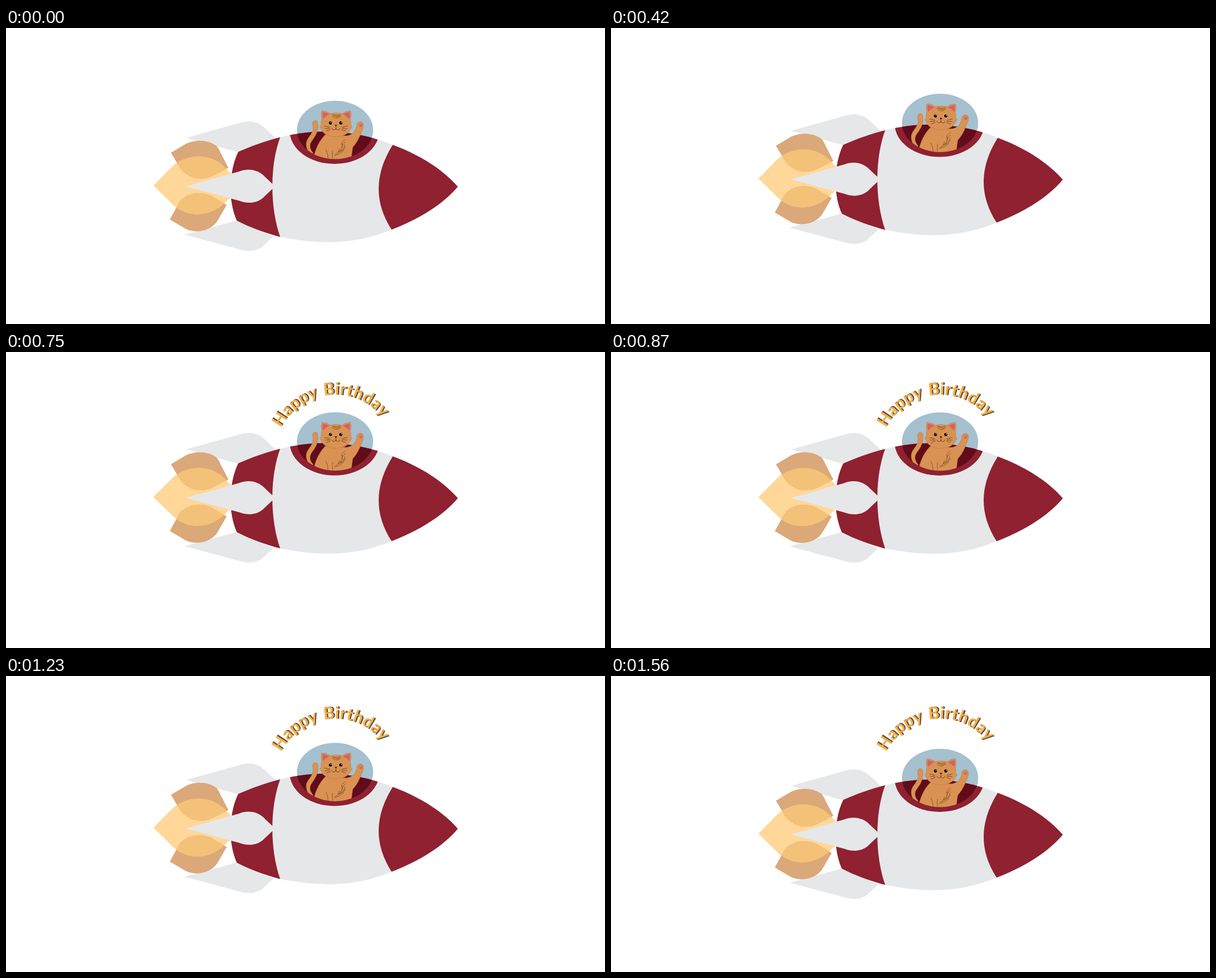
An HTML page that plays this animation: 1064 px wide and 527 px high, repeating every 1.66 s.

```html
<!DOCTYPE html>
<html lang="en">
<head>
<meta charset="utf-8">
<title>Birthday rocket</title>
<style>
  html, body { margin: 0; width: 100%; height: 100%; overflow: hidden; background: #fff; }
  svg { display: block; width: 100%; height: 100%; }
  .greeting { font: 700 30px Lato, "Open Sans", sans-serif; letter-spacing: .3px; word-spacing: 2.5px; }
  .hull { fill: #e6e7e8; }
  .red { fill: #8f2131; }
  .fur { fill: #d99253; stroke: #b9752f; stroke-width: .5; stroke-linejoin: round; }
  .pink { fill: #d4606a; }
  .mark { fill: none; stroke: #7c4a22; stroke-width: .8; stroke-linecap: round; }
  .face { fill: none; stroke: #4a2a18; stroke-width: .7; stroke-linecap: round; }
</style>
</head>
<body>
<svg viewBox="0 0 1064 527">
  <defs>
    <path id="arc" d="M478 183 A107 107 0 0 1 692 183"/>
    <path id="body" d="M412.5 220.5 C436 210 462 201 487 194.5 C555 177 627 183 687 208 C735 226 775 251 802.5 282.5 C776 314 736 339 685 359 C620 386 560 386 487 372 C458 364 433 355 410 343 C393 305 397 252 412.5 220.5Z"/>
    <path id="flame" d="M262 280.5 L293 249 C318 223 362 221 388 247 L420 281 L388 312 C360 339 318 339 293 311Z"/>
    <path id="jetTop" d="M293 222 L320 206 C337 198 358 199 373 209 Q378 214 381 222 L395 249 L368 263 C350 272 328 270 313 254 Q309 250 306 244Z"/>
    <path id="jetLow" d="M291 341 L319 357.5 C334 365 354 363 368 352 Q374 347 377 341 L392 315 L365 299 C347 291 327 292 311 306 Q306 312 303 319Z"/>
    <ellipse id="dome" cx="584.5" cy="181.5" rx="67.7" ry="52"/>
    <clipPath id="inBody"><use href="#body"/></clipPath>
    <clipPath id="inDome"><use href="#dome"/></clipPath>
    <clipPath id="inJets"><use href="#jetTop"/><use href="#jetLow"/></clipPath>
  </defs>

  <g id="greeting" class="greeting">
    <text fill="#4a4650"><textPath href="#arc" startOffset="51">Happy Birthday</textPath></text>
    <text fill="#fbb040"><textPath href="#arc" startOffset="49">Happy Birthday</textPath></text>
  </g>

  <g id="rocket">
    <path class="hull" d="M320 195.5 L415 169 C432 163 449 167 461 179 L480 197 L412 221Z"/>
    <path class="hull" d="M317 368 L409 343 L475 371 L459 386 C449 397 433 399 418 395Z"/>

    <use href="#flame" fill="#ffd798"/>
    <g fill="#dba879"><use href="#jetTop"/><use href="#jetLow"/></g>
    <use href="#flame" fill="#f4c179" clip-path="url(#inJets)"/>

    <use href="#dome" fill="#a5c0cf"/>
    <use href="#body" class="hull"/>
    <g clip-path="url(#inBody)">
      <path class="red" d="M380 180 H492 L487 194.5 C468.5 245 468.5 318 487 372 L490 385 H380Z"/>
      <path class="red" d="M692 200 L687 208 C654.5 260 653.5 310 685 359 L690 370 H820 V200Z"/>
      <ellipse class="red" cx="583.5" cy="183" rx="79.6" ry="59"/>
      <use href="#dome" fill="#620b1a"/>
    </g>
    <path class="hull" d="M319 282 L414 255.5 C431 249 448 252 460 265 L478 282 L460 299 C448 312 431 314 414 307.5Z"/>

    <g clip-path="url(#inDome)">
      <path class="fur" d="M540 224 C531 212 532 203 537 196 C543 188 547 182 545 174 C543 167 547 164 551 165 C555 167 554 172 554 178 C553 187 549 193 544 200 C538 208 539 215 546 223Z"/>
      <path class="fur" d="M568 189 C557 200 550 213 545 236 H613 C614 226 615 218 616 212 C624 204 629 192 634 179 C636 174 635 168 631 167 C626 166 622 170 623 175 C620 186 614 191 604 192Z"/>
      <path class="mark" d="M568 217 Q572 223 572 232 M580 219 Q579 226 580 232"/>
      <path class="mark" d="M602 199 Q596 202 596 208 M603 203 Q597 207 597 213 M602 208 Q602 214 594 219 M603 212 Q599 219 591 221 M597 206 Q599 216 589 222 M600 218 Q593 225 583 227 M592 215 Q592 222 585 225"/>
    </g>
    <g class="pink">
      <ellipse cx="630" cy="174" rx="2.5" ry="2"/>
      <circle cx="627.4" cy="171.4" r="1"/><circle cx="630" cy="170" r="1"/><circle cx="632.8" cy="171.4" r="1"/>
    </g>

    <path class="fur" d="M561 147.5 Q569 147 576 152.5 Q586 150 597 152.5 Q604 147 612 147.5 Q614 156 611.5 163 Q613 168 612.5 173 L615 176 L612 180 C608 189 598 193.5 586 193.5 C574 193.5 563 189 560 180 L557 175.5 L560 173 Q559 167 561 162 Q559 154 561 147.5Z"/>
    <path class="pink" d="M562.5 150 Q569 150 574 154 Q567 157 563.5 162 Q561.5 156 562.5 150Z"/>
    <path class="pink" d="M610.5 150 Q604 150 599 154 Q606 157 609.5 162 Q611.5 156 610.5 150Z"/>
    <path class="mark" d="M580 154 Q587 157 594 154 M579 156 Q583 161 588 160 M595 156 Q592 160 588 160 M582 155.5 Q587 159 593 156.5"/>
    <g id="eyes"></g>
    <path d="M583.6 172.4 H588.4 L586 175.6Z" fill="#3a1d14"/>
    <path class="face" d="M586 175.5 V178.5 M578.5 178.5 Q580 182 583 181.5 Q586 181 586 178.5 Q586 181 589 181.5 Q592 182 593.5 178.5"/>
    <path class="face" d="M575 176.5 L566 174.5 M575 178.5 L567 179 M576 180.5 L569 183.5 M597 176.5 L606 174.5 M597 178.5 L606 179 M596 180.5 L603 183.5"/>
  </g>
</svg>
<script>
  const $ = id => document.getElementById(id);
  const LOOP = 1660, STEP = 30, LAST = 1560;
  const PEAK = 810, RISE = 24;
  const FADE_FROM = 495, FADE_TO = 750;

  $('eyes').innerHTML = [576.3, 594.7].map(x => `
    <circle cx="${x}" cy="169" r="3.5" fill="#e8b865"/>
    <circle cx="${x}" cy="169" r="2.9" fill="#0c0808"/>
    <circle cx="${x + 1}" cy="168" r=".8" fill="#fff"/>`).join('');

  const clamp = v => Math.max(0, Math.min(1, v));

  function draw(t) {
    const lift = t < PEAK ? t / PEAK : (LAST - t) / (LAST - PEAK);
    $('rocket').setAttribute('transform', `translate(0 ${-RISE * lift})`);
    $('greeting').setAttribute('opacity', clamp((t - FADE_FROM) / (FADE_TO - FADE_FROM)));
  }

  const start = performance.now();
  function tick() {
    const t = (performance.now() - start) % LOOP;
    draw(Math.min(Math.floor(t / STEP) * STEP, LAST));
    requestAnimationFrame(tick);
  }
  draw(0);
  requestAnimationFrame(tick);
</script>
</body>
</html>
```
